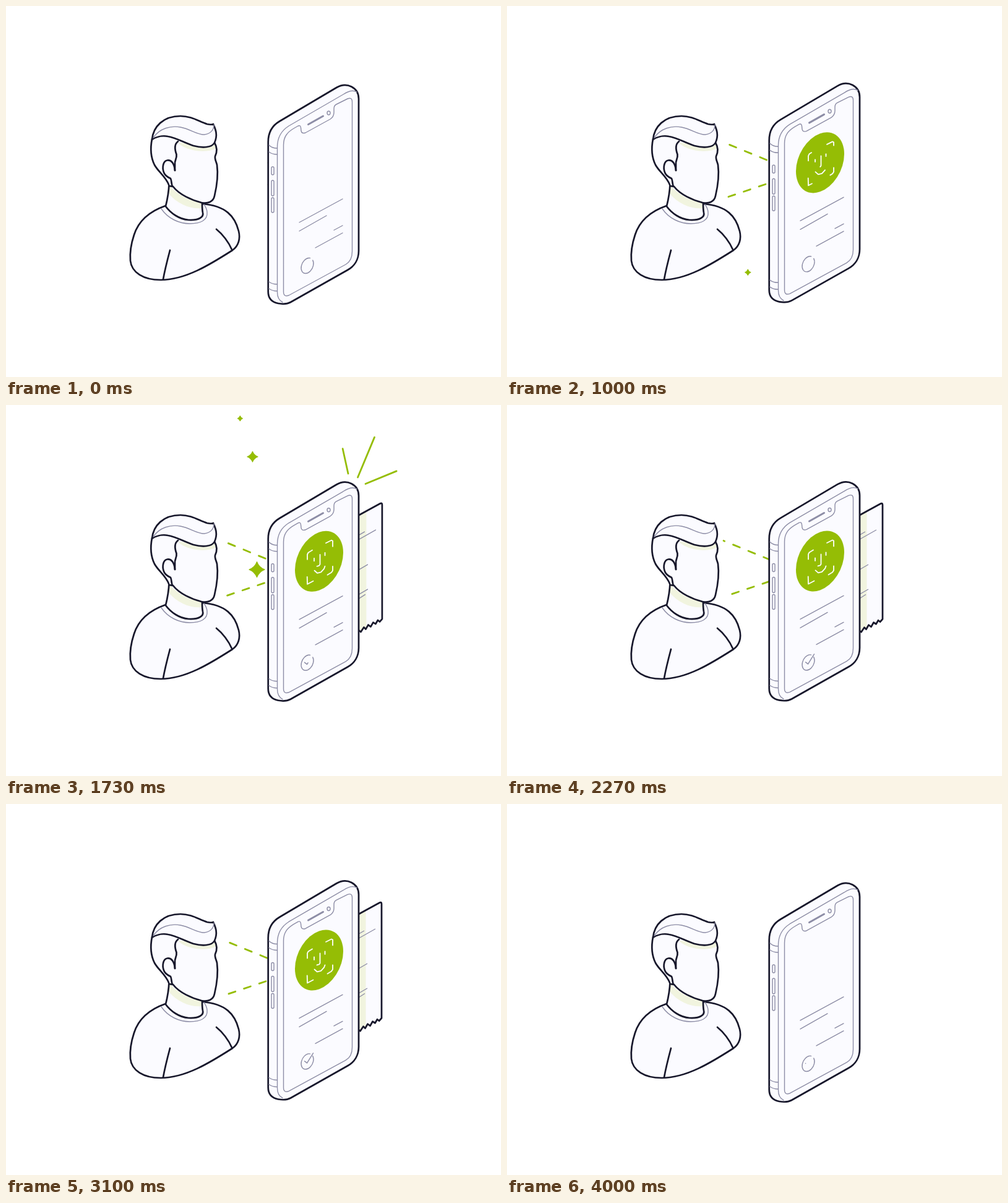
Write an HTML page with a canvas that moves like this. It is 800 px wide and 600 px high and loops after 4.03 s.

```html
<!DOCTYPE html>
<html lang="en">
<head>
<meta charset="utf-8">
<title>Face scan</title>
<style>
html, body { margin: 0; width: 100%; height: 100%; overflow: hidden; background: #fff; }
canvas { display: block; width: 800px; height: 600px; }
</style>
</head>
<body>
<canvas id="stage"></canvas>
<script>
const canvas = document.getElementById('stage');
const ratio = window.devicePixelRatio || 1;
canvas.width = 800 * ratio;
canvas.height = 600 * ratio;
const ctx = canvas.getContext('2d');

const LOOP = 4030;
const INK = '#17172b', THIN = '#8d8da6', FILL = '#fbfbff', GREEN = '#95bd05', PALE = '#f1f4df';

const clamp = v => Math.max(0, Math.min(1, v));
const span = (t, start, dur) => clamp((t - start) / dur);
const quadInOut = u => u < .5 ? 2 * u * u : 1 - 2 * (1 - u) ** 2;
const cubicOut = u => 1 - (1 - u) ** 3;
const backIn = u => u * u * (2.70158 * u - 1.70158);
const backOut = u => 1 - backIn(1 - u);
// eases in at one time and out again at another
const inOut = (t, a, da, b, db, easeIn, easeOut) =>
  t < b ? easeIn(span(t, a, da)) : 1 - easeOut(span(t, b, db));

function shape(d, fill, stroke, width) {
  const path = new Path2D(d);
  if (fill) { ctx.fillStyle = fill; ctx.fill(path); }
  if (stroke) { ctx.strokeStyle = stroke; ctx.lineWidth = width; ctx.stroke(path); }
}
const bold = (d, fill) => shape(d, fill, INK, 2.7);
const thin = d => shape(d, null, THIN, 1.4);

// strokes the first part p of a polyline given as [x, y, x, y, ...]
function trim(pts, p, color, width) {
  if (p <= 0) return;
  const seg = [];
  let total = 0;
  for (let i = 2; i < pts.length; i += 2) {
    const len = Math.hypot(pts[i] - pts[i - 2], pts[i + 1] - pts[i - 1]);
    seg.push(len);
    total += len;
  }
  let left = total * p;
  ctx.beginPath();
  ctx.moveTo(pts[0], pts[1]);
  for (let i = 0; i < seg.length && left > 0; i++) {
    const k = Math.min(1, left / seg[i]), j = i * 2;
    ctx.lineTo(pts[j] + (pts[j + 2] - pts[j]) * k, pts[j + 1] + (pts[j + 3] - pts[j + 1]) * k);
    left -= seg[i];
  }
  ctx.strokeStyle = color;
  ctx.lineWidth = width;
  ctx.stroke();
}

// circle lying in the plane of the screen
function isoArc(x, y, r, from, to) {
  ctx.save();
  ctx.translate(x, y);
  ctx.transform(.867, -.31, 0, 1.045, 0, 0);
  ctx.beginPath();
  ctx.arc(0, 0, r, from, to);
  ctx.restore();
}

function drawMan() {
  // torso
  bold('M258 323C235 331 215 345 207 370C202 385 200 400 201 412C203 431 222 443 250 443C290 443 330 418 366 395' +
    'C376 388 379 376 376 364C370 340 355 323 318 320', FILL);
  bold('M265 395C261 410 257 425 254 442');
  bold('M340 361C350 369 360 382 365 394');
  thin('M251 328C262 344 280 352 297 352C315 352 326 346 325 334C325 328 322 324 320 321');
  // neck
  const neck = 'M263.5 288C263 302 261 312 258 324C266 335 280 345 295 346C312 347 320 341 318 334C317 330 317 325 317 319';
  shape(neck, FILL);
  shape('M264 290C278 306 296 315 317 318L317 327C300 329 277 321 263 303Z', PALE);
  bold(neck);
  // head
  shape('M236 216C233 230 234 245 240 257C246 268 258 278 264 292L270 292C280 305 300 314 316 318C326 320 335 317 337 307' +
    'C341 290 343 272 341 257C340 252 337 248 338 243C342 235 341 228 337 221L300 200Z', FILL);
  shape('M278 221C288 233 322 240 340 230L337 219L300 222Z', PALE);
  bold('M236 215C233 230 234 245 240 257C246 268 258 276 263 289');
  bold('M278 219C271 224 273 233 275.5 240C276.5 247 272 250 273 256L273 266');
  bold('M337 221C341 228 342 235 338 243C337 248 340 252 341 257C343 272 341 290 337 307C335 317 326 320 316 318' +
    'C300 314 280 305 270 292');
  bold('M273 266C272 254 267 249 261 249.5C254 250 252 261 255 269C257 275 262 277 266 279C268 283 267 288 269 292L264 291');
  // hair
  bold('M236 216C238 195 254 178 282 178C300 178 312 187 325 191C330 192 333 192 335 191C338 198 343 208 337 221' +
    'C333 229 318 230 303 226C290 222 275 213 262 211C252 209 242 212 236 216Z', FILL);
  thin('M238 213C248 198 266 193 282 196C298 199 308 208 320 208C331 207 336 200 336 192');
}

const zigzag = [[603.5, 354], [600.5, 351.5], [597, 357.5], [593, 355], [589, 362], [585, 359],
  [581, 366], [578, 363], [573, 370.5], [570, 368]];

function drawReceipt(t) {
  const out = inOut(t, 1340, 450, 3100, 730, backOut, backIn);
  if (out <= 0) return;
  const dx = (out - 1) * 39 - .5;
  ctx.save();
  ctx.translate(dx, -.57 * dx);
  const edge = zigzag.map(p => 'L' + p).join('');
  const paper = 'M540 198L604 163Q607.5 161 607.5 165L607.5 349.5' + edge + 'L540 388Z';
  shape(paper, FILL);
  ctx.save();
  ctx.clip(new Path2D(paper));
  ctx.fillStyle = PALE;
  ctx.fillRect(540, 150, 42, 250);
  ctx.restore();
  thin('M566 216L579 208.5M566 223L597 205.5M566 272L584 261.5M566 312L584 301.5M566 319L580 310');
  bold(paper);
  ctx.restore();
}

function drawBeams(t) {
  const lo = 424 - 74 * quadInOut(span(t, 250, 400));
  const hi = 432 - 82 * quadInOut(span(t, 3730, 240));
  const step = 24.6;
  ctx.strokeStyle = GREEN;
  ctx.lineWidth = 2.8;
  for (const [y, slope, shift] of [[223.5, .41, 0], [313.5, -.337, -1.7]]) {
    const first = 374.5 + shift - .03416 * (t - 530);
    const base = 325 + (((first - 325) % step) + step) % step;
    for (let x = base; x < hi; x += step) {
      const a = Math.max(x + 1.2, lo), b = Math.min(x + 12, hi);
      if (a >= b) continue;
      ctx.beginPath();
      ctx.moveTo(a, y + slope * (a - 351));
      ctx.lineTo(b, y + slope * (b - 351));
      ctx.stroke();
    }
  }
}

// x at start, first and last y, start time, duration, radius
const stars = [
  [391.5, 450, 8, 853, 1003, 9.5],
  [408, 335, 25, 1094, 920, 10],
  [412, 436, 69, 1298, 900, 12.5]
];

function drawStars(t) {
  for (const [x0, y0, y1, start, dur, size] of stars) {
    const u = span(t, start, dur);
    if (u <= 0 || u >= 1) continue;
    const r = size * Math.sin(Math.PI * u) ** .9;
    const c = r * .28;
    ctx.save();
    ctx.translate(x0 - .015 * (t - start), y0 + (y1 - y0) * quadInOut(u));
    ctx.beginPath();
    ctx.moveTo(0, -r);
    ctx.quadraticCurveTo(c, -c, r, 0);
    ctx.quadraticCurveTo(c, c, 0, r);
    ctx.quadraticCurveTo(-c, c, -r, 0);
    ctx.quadraticCurveTo(-c, -c, 0, -r);
    ctx.fillStyle = ctx.strokeStyle = GREEN;
    ctx.lineWidth = 1.2;
    ctx.fill();
    ctx.stroke();
    ctx.restore();
  }
}

function drawBurst(t) {
  const end = cubicOut(span(t, 1360, 500));
  const from = quadInOut(span(t, 1750, 490));
  if (end <= 0 || from >= 1) return;
  ctx.strokeStyle = GREEN;
  ctx.lineWidth = 2.8;
  for (const [x, y, dx, dy] of [[553, 111, -9, -41], [568.5, 117, 27.5, -66], [581, 127.5, 51, -21]]) {
    ctx.beginPath();
    ctx.moveTo(x + dx * from, y + dy * from);
    ctx.lineTo(x + dx * end, y + dy * end);
    ctx.stroke();
  }
}

const face = [
  [487, 253, 487, 245, 488.5, 242, 495, 238],
  [517, 226.5, 526, 222, 528, 223, 528, 232],
  [486.7, 281, 487, 293, 496.5, 288],
  [528, 264, 528, 271, 526, 274, 519.5, 278],
  [498, 251, 498, 255.5],
  [515.5, 242, 515.5, 246.5],
  [507.5, 245, 507.5, 261, 506, 263, 502.5, 264],
  [498.5, 271, 503, 275, 509, 273.5, 514, 268, 515.5, 264]
];

function drawPhone(t) {
  bold('M423.7 462L423.7 220C423.7 204 431 193 442 186.5L534 132C551 122 570 132 570 150L570 396C570 410 563 421 552 427' +
    'L460 479C454 482.3 447 482.3 440 481C430 479 423.7 473 423.7 462Z', FILL);
  // frame and side
  thin('M447 479C441 476 438.5 470 438.5 463L438.5 228C438.5 212 446 201 457 194L545 143C554 137 562 136 567 139');
  thin('M425 225C429 229 433 230 438 230M425 236C429 239 433 240 438 240M425 446C429 449 433 450 438 450' +
    'M425 457C429 460 433 461 438 461');
  for (const [y, h] of [[260, 13], [282, 25], [310, 24]]) {
    ctx.beginPath();
    ctx.roundRect(429, y, 4, h, 2);
    ctx.stroke();
  }
  // screen
  thin('M448.5 462L448.5 225C448.5 211 455 204 465 198L472 194Q476 192 476.5 197L477 202Q478 207 484 205' +
    'L524 183Q530 179 530 172L530 166Q530 161 534 159L552 150Q559.5 147 559.5 155L559.5 397C559.5 407 556 414 549 418' +
    'L457 468Q448.5 471 448.5 462Z');
  shape('M488.5 191.5L512.5 178', null, THIN, 3);
  ctx.beginPath();
  ctx.ellipse(521.5, 173, 2.5, 3, 0, 0, 7);
  ctx.lineWidth = 1.4;
  ctx.stroke();
  thin('M474 350L544 312M474 364L518 339M530 362.5L544 355M500 391L544 367');

  isoArc(487, 420, 11.5, -.5, Math.PI * 2 - 1.1);
  ctx.strokeStyle = THIN;
  ctx.lineWidth = 1.4;
  ctx.stroke();
  const tick = inOut(t, 1560, 420, 3500, 520, quadInOut, quadInOut);
  trim([482.5, 419.5, 486.5, 422.5, 496.5, 406.5], tick, THIN, 1.5);

  const grow = inOut(t, 140, 500, 3430, 500, backOut, backIn);
  if (grow > 0) {
    isoArc(506, 256, 45 * grow, 0, Math.PI * 2);
    ctx.fillStyle = GREEN;
    ctx.fill();
  }
  const drawn = inOut(t, 650, 500, 3300, 500, quadInOut, quadInOut);
  for (const line of face) trim(line, drawn, '#fff', 1.8);
}

function frame(now) {
  const t = now % LOOP;
  // the phone floats up and down three times per loop
  const bob = -2.6 * (1 - Math.cos(6 * Math.PI * t / LOOP));
  ctx.setTransform(ratio, 0, 0, ratio, 0, 0);
  ctx.fillStyle = '#fff';
  ctx.fillRect(0, 0, 800, 600);
  ctx.lineCap = ctx.lineJoin = 'round';
  drawMan();
  drawBurst(t);
  ctx.save();
  ctx.translate(0, bob);
  drawBeams(t);
  drawReceipt(t);
  ctx.restore();
  drawStars(t);
  ctx.save();
  ctx.translate(0, bob);
  drawPhone(t);
  ctx.restore();
  requestAnimationFrame(frame);
}

frame(0);
</script>
</body>
</html>
```
